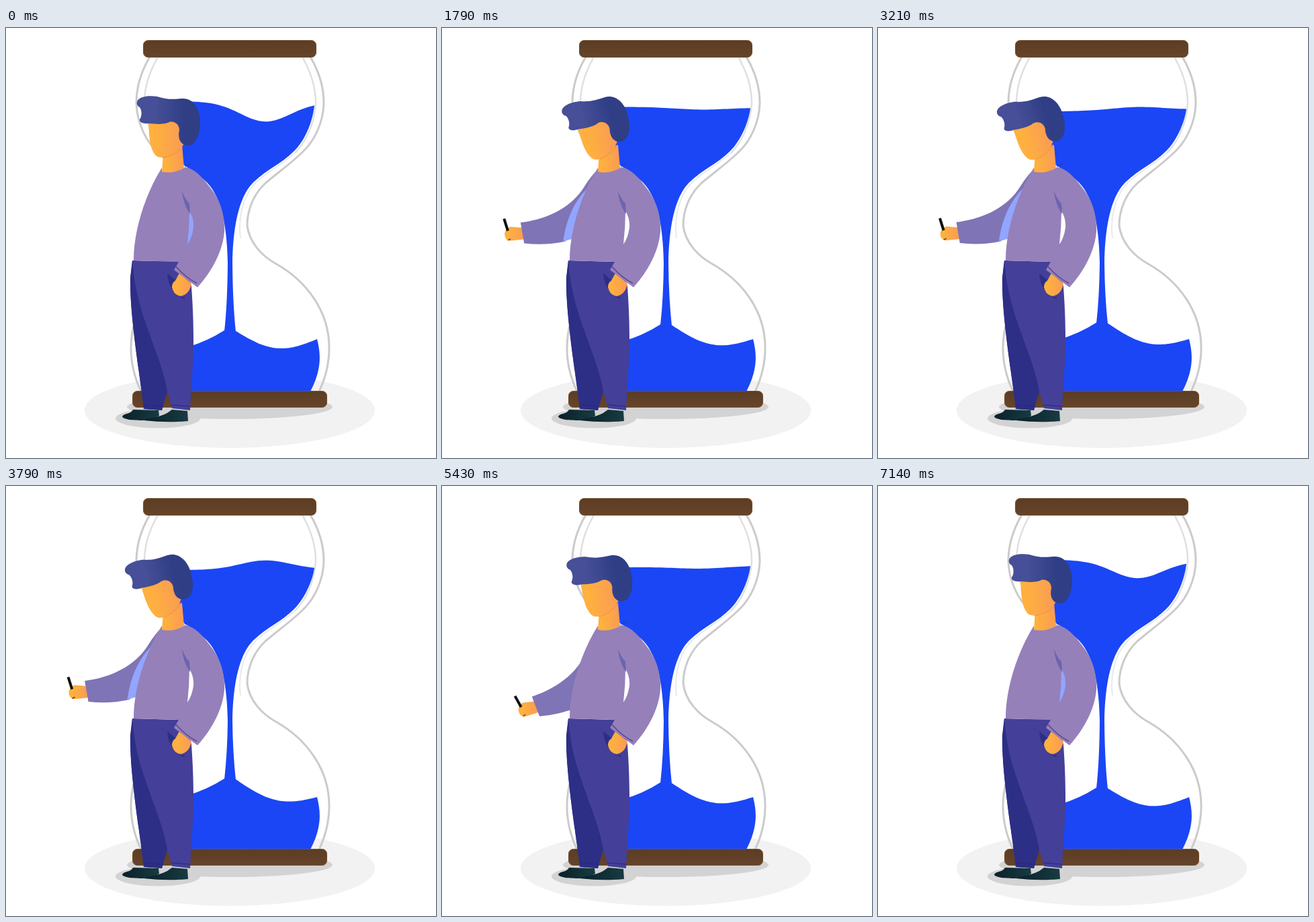
Recreate the animation shown at these times as an HTML page. Size 640 by 640 pixels, loop 7210 ms.

```html
<!DOCTYPE html>
<html lang="en">
<head>
<meta charset="utf-8">
<title>Waiting by the hourglass</title>
<style>
  html, body { margin: 0; width: 100%; height: 100%; overflow: hidden; background: #fff; }
  svg { display: block; width: 100%; height: 100%; }
</style>
</head>
<body>
<svg viewBox="0 0 640 640">
  <defs>
    <linearGradient id="wood" x2="0" y2="1">
      <stop stop-color="#5c3d23"/><stop offset="1" stop-color="#65442a"/>
    </linearGradient>
    <linearGradient id="hairTone">
      <stop offset=".3" stop-color="#464f97"/><stop offset=".75" stop-color="#2f3e85"/>
    </linearGradient>
    <linearGradient id="skin">
      <stop offset=".2" stop-color="#ffb03f"/><stop offset="1" stop-color="#f99b55"/>
    </linearGradient>
    <linearGradient id="shoe">
      <stop stop-color="#0a2029"/><stop offset="1" stop-color="#183b42"/>
    </linearGradient>
    <g id="glass" fill="none">
      <path stroke="#cbcbcb" stroke-width="3" d="M453 43C466 65 473 86 473 112C472 140 460 168 440 186C420 205 402 217 386 231C369 247 359 270 359 294C362 320 382 340 402 351C446 376 481 420 481 476C481 502 475 522 466 541"/>
      <path stroke="#dfdfdf" stroke-width="2.5" d="M441 43C453 65 461 86 461 112C459 143 446 170 430 186"/>
      <path stroke="#e4e4e4" stroke-width="1.5" d="M430 186C412 202 390 213 372 230C352 250 345 285 349 313"/>
    </g>
  </defs>

  <ellipse cx="333" cy="569" rx="216" ry="56" fill="#f2f2f2"/>
  <ellipse cx="333" cy="564" rx="153" ry="18" fill="#d3d3d3"/>
  <ellipse cx="226" cy="581" rx="63" ry="14.5" fill="#d3d3d3"/>

  <use href="#glass"/>
  <use href="#glass" transform="translate(667) scale(-1 1)"/>
  <g fill="#1b46f5">
    <path id="upperSand"/>
    <path id="lowerSand"/>
  </g>
  <g fill="url(#wood)" stroke="#75502f">
    <rect x="204.5" y="18.5" width="257" height="25" rx="7"/>
    <rect x="188.5" y="540.5" width="289" height="24" rx="7"/>
  </g>

  <g id="backArm">
    <path fill="url(#skin)" d="M120 296L101 294Q93 297 92 304Q92 314 100 315L121 313Z"/>
    <path fill="none" stroke="#6b3a1c" stroke-width="1.5" d="M97 314L101 312"/>
    <path stroke="#111" stroke-width="4" d="M91.5 282L97 300"/>
    <path fill="#7f74b5" d="M236 206Q222 219 212 235C194 264 160 283 116 288L121 319Q152 323 182 317Q215 280 240 235Z"/>
    <path fill="#92a5ff" d="M232 225Q188 255 179 317Q205 311 222 299L234 280Z"/>
  </g>

  <path fill="url(#shoe)" d="M173 578C176 573 186 575 189 568L227 569L228 577C222 581 212 583 205 584C190 584 174 583 173 578Z"/>
  <path fill="url(#shoe)" d="M205 584C212 580 228 580 240 573L247 568L270 570L271 585Q240 588 205 584Z"/>
  <path fill="#443f98" d="M188 346L258 348Q272 362 276 385C279 425 280 470 278 500L274 569L247 566L240 541L232 569L205 567C200 520 184 430 185 372Z"/>
  <path fill="#2d2e86" d="M188 346C192 400 205 430 218 468Q236 515 240 541L232 569L205 567C200 520 184 430 185 372Z"/>
  <path fill="none" stroke="#2b2873" d="M204 561L234 563M246 561L274 563"/>
  <path fill="#2d2e86" d="M240 365L252 375L249 391Q241 381 240 365ZM256 400L267 401L265 403Z"/>
  <path fill="url(#skin)" d="M258 365L276 380Q273 397 260 399Q250 398 247 386Q247 379 252 376Z"/>

  <path fill="url(#skin)" d="M234 186L262 174L265 208Q248 220 232 214Z"/>
  <path fill="none" stroke="#2b3f9c" stroke-width="1.2" d="M266 206L275 202"/>
  <path fill="#9580ba" fill-rule="evenodd" d="M232 208L232 214Q250 218 267 207C282 210 292 222 305 239C320 258 326 280 325 303C323 330 308 361 285 386L250 360L257 348L190 346C190 300 208 246 232 208ZM273 272Q280 284 279 297Q277 312 270 322Q273 297 273 272Z"/>
  <path fill="#6c65ad" d="M262 243Q267 256 273 261L274 277Q264 263 262 243Z"/>
  <path fill="none" stroke="#5a478f" stroke-width="1.6" d="M253 355Q268 372 284 380"/>

  <g id="head">
    <path fill="url(#skin)" d="M212 138C213 165 214 180 223 190Q229 195 243 191Q257 186 264 174L262 136Z"/>
    <path fill="none" stroke="#ee9144" d="M233 193Q250 191 263 178"/>
    <path fill="url(#hairTone)" d="M195 110C197 102 212 100 225 102C240 107 250 106 262 105C280 104 289 122 289 140C289 160 282 175 270 175C260 174 255 165 258 152C258 143 250 138 243 140C235 144 222 143 213 142C203 143 198 140 199 136C203 130 202 122 199 118C196 117 194 113 195 110Z"/>
  </g>
</svg>
<script>
const LOOP = 7210, STEP = LOOP / 101, WAVES = 3;

const byId = id => document.getElementById(id);
const mix = (a, b, k) => a + (b - a) * k;

// Sine ease from 0 to 1 between two times
function ease(t, from, to) {
  const k = Math.min(1, Math.max(0, (t - from) / (to - from)));
  return (1 - Math.cos(Math.PI * k)) / 2;
}

// Polyline between two x positions, height given as a function of 0..1
function trace(x0, x1, height, count = 40) {
  return Array.from({ length: count + 1 }, (_, i) => {
    const u = i / count;
    return `${mix(x0, x1, u)} ${height(u)}`;
  }).join('L');
}

function drawSand(phase) {
  const rise = 1 - Math.abs(1 - 2 * phase);
  const slosh = 2 * Math.sin(2 * Math.PI * phase);

  // A tilted line with one swell that turns from trough to crest
  const surface = trace(262, 459, u =>
    mix(109 + 20 * rise + slosh, 111 + 15 * rise, u) +
    (29 - 50 * rise) * Math.exp(-(((u - .63) / .267) ** 2)));
  const peak = 451 - 17 * rise;
  const pile = trace(342, 463, u =>
    mix(peak, 463, u) + (19.5 - 2 * rise) * Math.sin(Math.PI * u));

  byId('upperSand').setAttribute('d', `M${surface}
    C456 143 443 170 428 184C411 201 388 211 370 228
    C350 246 338 285 337 350Q337.5 ${peak - 40} 342 ${peak + 1}
    L325 ${peak}Q329.5 ${peak - 40} 330 350
    C329 285 317 246 297 228C279 211 256 201 239 184Q222 170 215 150Z`);
  byId('lowerSand').setAttribute('d', `M270 ${peak + 24}
    Q300 ${peak + 15} 325 ${peak - 1}Q333 ${peak - 3} ${pile}
    C470 490 468 512 453 541H213L200 490Z`);
}

function drawMan(t) {
  const reach = ease(t, 276, 1974) - ease(t, 4600, 7050);
  const bow = ease(t, 300, 2130) - ease(t, 4570, 6290);
  const sway = 4.6 * (ease(t, 1974, 2724) - ease(t, 2724, 3474) +
    ease(t, 3474, 4224) - ease(t, 4224, 4974));
  byId('backArm').setAttribute('transform', `rotate(${mix(-49, .8, reach) - sway} 247 215)`);
  byId('head').setAttribute('transform', `rotate(${-15 * bow} 244 186)`);
}

function draw(time) {
  const t = Math.floor(time / STEP + .05) * STEP % LOOP;
  drawSand(t * WAVES / LOOP % 1);
  drawMan(t);
}

const start = performance.now();
function tick() {
  draw((performance.now() - start) % LOOP);
  requestAnimationFrame(tick);
}
tick();
</script>
</body>
</html>
```
